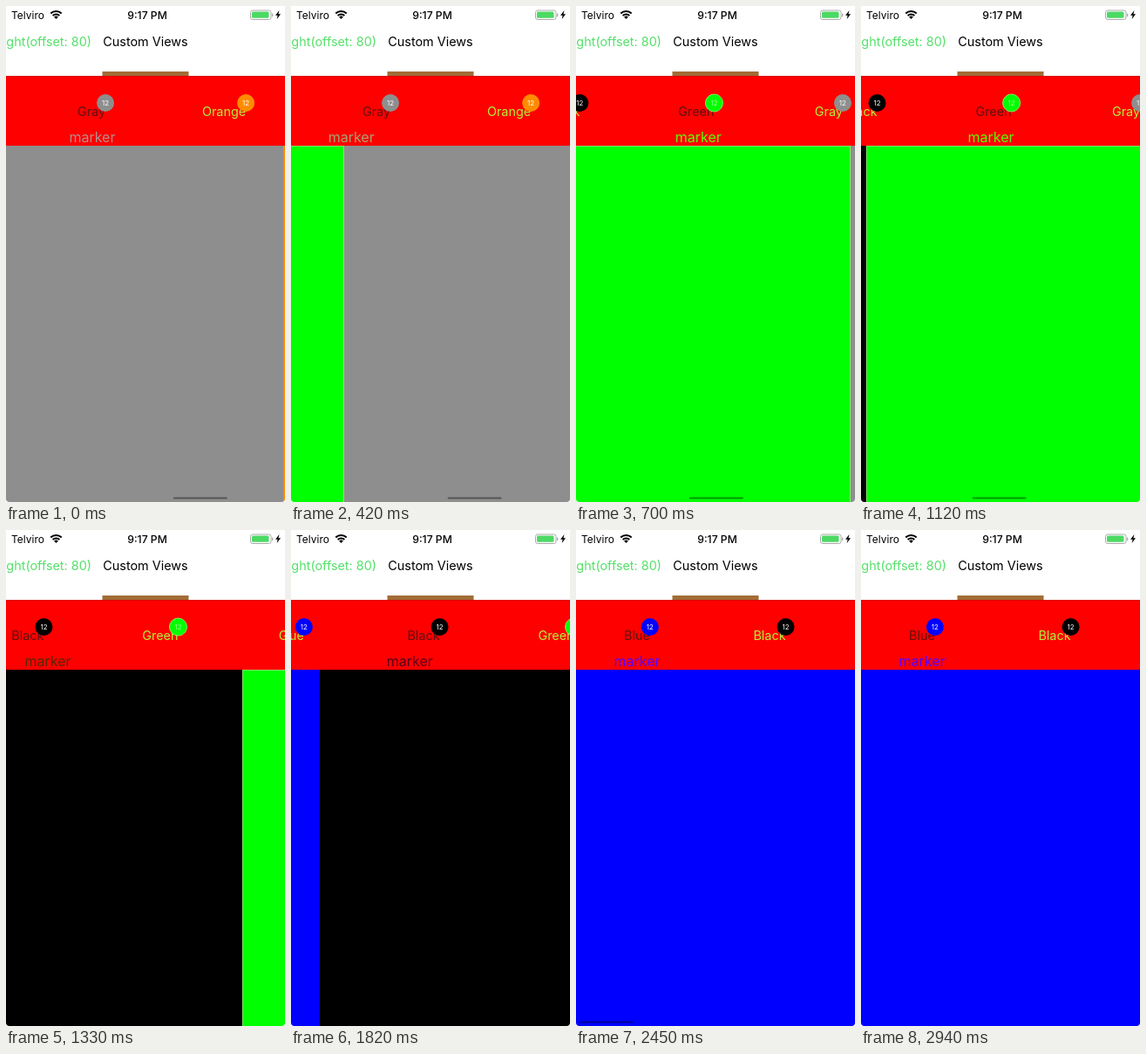
Write an HTML page with a canvas that moves like this. It is 320x568 px and loops after 3010 ms.

```html
<!DOCTYPE html>
<html lang="en">
<head>
<meta charset="utf-8">
<title>Paged tabs</title>
<style>
html, body { margin: 0; width: 100%; height: 100%; overflow: hidden; background: #fff; }
canvas { display: block; width: 320px; height: 568px; }
</style>
</head>
<body>
<canvas id="stage" width="320" height="568"></canvas>
<script>
const ctx = document.getElementById('stage').getContext('2d');
const W = 320, H = 568, LOOP = 3010, STEP = 70;
const LABEL_GAP = 152, FIRST_LABEL = 70;
const pages = [
  { name: 'Blue', rgb: [0, 0, 255] },
  { name: 'Black', rgb: [0, 0, 0] },
  { name: 'Green', rgb: [0, 255, 0], rim: '#80f068', ink: '#a0ff90' },
  { name: 'Gray', rgb: [142, 142, 142] },
  { name: 'Orange', rgb: [255, 140, 0] }
];
// Each swipe goes one page back; the tab strip follows with its own easing.
const swipes = [
  { start: 302, pace: 1.122, select: 448, from: 428, to: 222 },
  { start: 1090, pace: 1, select: 1253, from: 222, to: 70 },
  { start: 1745, pace: 1, select: 1918, from: 70, to: 0 }
];

const clamp = x => Math.max(0, Math.min(1, x));
const smooth = x => x * x * (3 - 2 * x);
const css = rgb => `rgb(${rgb.map(Math.round)})`;

// Finger drag up to half a page, then exponential settling.
function swipeDistance(t) {
  if (t <= 0) return 0;
  if (t < 180) return 160 * (t / 180) ** 1.8;
  return W - 160 * Math.exp(-(t - 180) / 50.5);
}

function stateAt(t) {
  let scroll = 960 + 2 * Math.exp(-t / 150), strip = 428, selected = 3;
  for (const s of swipes) {
    scroll -= swipeDistance((t - s.start) / s.pace);
    strip += (s.to - s.from) * smooth(clamp((t - s.select) / 300));
    if (t >= s.select) selected--;
  }
  return { scroll: Math.max(0, scroll), strip, selected };
}

function rect(x, y, w, h, color, r = 0) {
  ctx.fillStyle = color;
  ctx.beginPath();
  ctx.roundRect(x, y, w, h, r);
  ctx.fill();
}

function text(str, x, y, size, color, align = 'center', weight = 400) {
  ctx.font = `${weight} ${size}px Inter, Roboto, sans-serif`;
  ctx.textAlign = align;
  ctx.fillStyle = color;
  ctx.fillText(str, x, y);
  return ctx.measureText(str).width;
}

function drawStatusBar() {
  text('Telviro', 6, 14.5, 12, '#000', 'left');
  text('9:17 PM', 162, 14.5, 12.2, '#000', 'center', 500);

  ctx.strokeStyle = ctx.fillStyle = '#000';
  ctx.lineWidth = 2;
  for (const r of [5.4, 8.8]) {
    ctx.beginPath();
    ctx.arc(57.5, 14.8, r, -Math.PI * 0.75, -Math.PI * 0.25);
    ctx.stroke();
  }
  ctx.beginPath();
  ctx.moveTo(57.5, 15);
  ctx.arc(57.5, 15, 3.4, -Math.PI * 0.75, -Math.PI * 0.25);
  ctx.fill();

  ctx.strokeStyle = '#aaa';
  ctx.lineWidth = 1;
  ctx.beginPath();
  ctx.roundRect(280.5, 5, 23.5, 10.5, 2.5);
  ctx.stroke();
  rect(282, 6.6, 19.5, 7.2, '#4cd964', 1.5);
  rect(305, 8.4, 1.3, 3.8, '#aaa', 0.6);
  ctx.fillStyle = '#000';
  ctx.fill(new Path2D('M313.5 5L309 10.7H311.6L310.7 15L315 9.2H312.4Z'));
}

function drawTitles() {
  text('right(offset: 80)', 98, 46, 14.4, '#55e06a', 'right');
  text('Custom Views', 160, 46, 14.4, '#000');
  rect(110.5, 75, 99, 5, '#a26c36');
}

function drawBadge(page, x) {
  ctx.fillStyle = css(page.rgb);
  ctx.beginPath();
  ctx.arc(x, 111, 10, 0, Math.PI * 2);
  ctx.fill();
  if (page.rim) {
    ctx.strokeStyle = page.rim;
    ctx.lineWidth = 1;
    ctx.stroke();
  }
  text('12', x, 113.8, 8, page.ink || '#fff');
}

function drawStrip({ scroll, strip, selected }) {
  rect(0, 80, W, 80, '#f00');
  rect(0, 80, W, 1, '#d80000');
  const pos = scroll / W, i = Math.floor(pos), mix = pos - i;
  const [r, g, b] = pages[i].rgb.map((c, k) => c + (pages[i + 1].rgb[k] - c) * mix);
  // The marker lets some of the red strip through.
  const color = css([r + (255 - r) * 0.35, g, b]);
  text('marker', FIRST_LABEL + LABEL_GAP * pos - strip, 155.5, 16, color);
  pages.forEach((page, n) => {
    const x = FIRST_LABEL + LABEL_GAP * n - strip;
    const w = text(page.name, x, 125.5, 14.4, n === selected ? '#5f1010' : '#b0f03c');
    drawBadge(page, x + w / 2);
  });
}

function drawPages(scroll, t) {
  pages.forEach((page, n) => {
    const x = Math.round(n * W - scroll);
    rect(x, 160, W, H - 160, page.rim || css(page.rgb));
    if (page.rim) rect(x + 1, 161, W - 2, H - 161, css(page.rgb));
  });
  const alpha = 0.4 * (1 - clamp((t - 2500) / 300));
  rect(3.7 + scroll * 0.1956, 562.5, 62, 2, `rgba(0,0,0,${alpha})`, 1);
  ctx.fillStyle = '#fff';
  ctx.fill(new Path2D('M0 564V568H4Q0 568 0 564ZM320 564V568H316Q320 568 320 564Z'));
}

function frame(now) {
  const t = Math.floor((now % LOOP) / STEP) * STEP;
  const state = stateAt(t);
  rect(0, 0, W, H, '#fff');
  drawStatusBar();
  drawTitles();
  drawPages(state.scroll, t);
  drawStrip(state);
  requestAnimationFrame(frame);
}
frame(performance.now());
</script>
</body>
</html>
```
